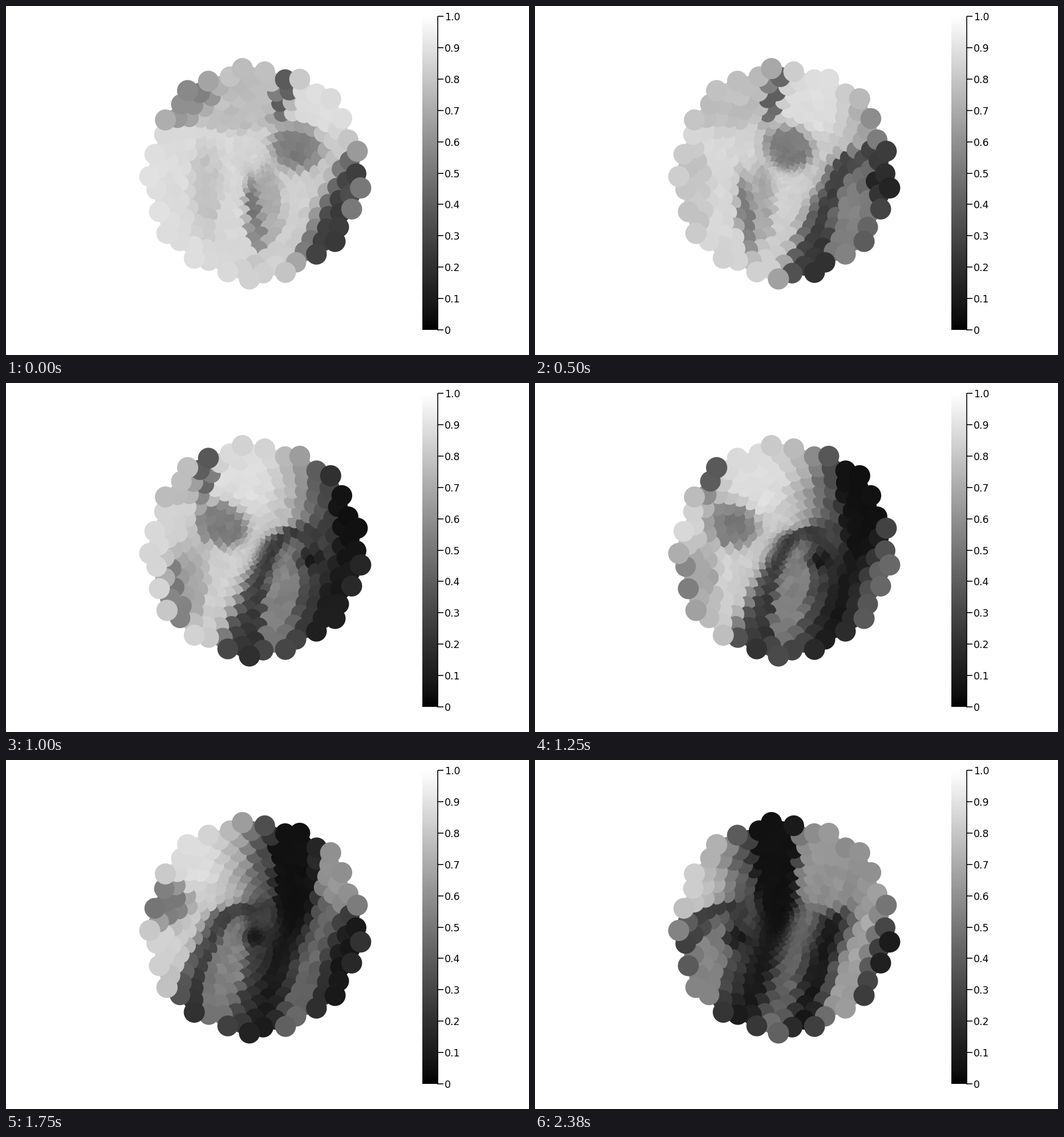
A matplotlib script that plays this animation: 917x611 px, repeating every 2510 ms.

```python
import numpy as np
import matplotlib.pyplot as plt
from matplotlib.animation import FuncAnimation

W, H, DPI = 917, 611, 100
PT = 72 / DPI
CENTER = 436.8, 292.2
DOTS, STEPS = 400, 20
SPEED = 17.3           # scene shift per step, px
TICK, STEP_MS = 10, 125
PHI = (1 + 5 ** 0.5) / 2

# Soft ellipses on the scene: x, y, half-axes, tilt in degrees, lightness
SHAPES = [
    (400, 140, 110, 75, 0, .77),
    (322, 168, 54, 24, -35, .57),
    (346, 320, 26, 85, 0, .79),
    (460, 350, 75, 28, 90, .69),
    (434, 370, 70, 13, 84, .50),
    (488, 150, 50, 14, 103, .35),
    (558, 168, 54, 58, 0, .88),
    (514, 246, 46, 40, 20, .51),
    (626, 372, 102, 32, 104, .54),
    (678, 312, 22, 16, 0, .08),
    (860, 150, 115, 95, 90, .60),
    (750, 160, 148, 41, 90, .05),
]


def sigmoid(x):
    return 1 / (1 + np.exp(-np.clip(x, -50, 50)))


def gray(light):
    """Perceptual lightness (0..1) to an sRGB gray level."""
    light = 100 * np.clip(light, 0, 1)
    lum = np.where(light > 8, ((light + 16) / 116) ** 3, light / 903.3)
    return np.where(lum > .0031308, 1.055 * lum ** (1 / 2.4) - .055, 12.92 * lum)


def rgb(light):
    return np.repeat(gray(light)[..., None], 3, axis=-1)


def backdrop(x, y):
    """Bright on the left, slanted dark stripes on the right."""
    low = sigmoid((y - 250) / 6)
    edge = 672 - 68 * low - .45 * np.maximum(y - 250, 0)
    bright = .89 - .0002 * (x - 235)
    t = x + .33 * (y - 350)
    swing = np.maximum(.35 + .0023 * (t - 780), .08)
    stripes = .08 + swing * (.5 + .5 * np.cos(2 * np.pi * (t - 780) / 110))
    dark = stripes + .11 * sigmoid((690 - t) / 10)
    return bright + (dark - bright) * sigmoid((x - edge) / (18 - 11 * low))


def scene(x, y):
    field = backdrop(x, y)
    for cx, cy, a, b, tilt, value in SHAPES:
        c, s = np.cos(np.radians(tilt)), np.sin(np.radians(tilt))
        dx, dy = x - cx, y - cy
        d = np.hypot((dx * c + dy * s) / a, (dy * c - dx * s) / b)
        field += (value - field) * sigmoid((1 - d) * np.sqrt(a * b) / 5)
    grain = np.sin(.41 * x + .23 * y) * np.sin(.31 * y - .19 * x)
    return field + .15 * field * (1 - field) * grain


# Golden-angle spiral, drawn from the middle outwards
n = np.arange(DOTS)
theta = 2 * np.pi * PHI * n
radius = 187.3 * n / (DOTS - 1)
px = CENTER[0] + radius * np.cos(theta)
py = CENTER[1] - radius * np.sin(theta)
diameter = 37.3 * np.sqrt(n / (DOTS - 1))
looks = [rgb(scene(px + SPEED * k, py)) for k in range(STEPS)]

fig = plt.figure(figsize=(W / DPI, H / DPI), dpi=DPI, facecolor="white")
ax = fig.add_axes([0, 0, 1, 1])
ax.axis("off")

# Colour bar
LEFT, RIGHT, TOP, BOTTOM = 730, 757, 18, 567
ramp = rgb(np.linspace(1, 0, 256)[:, None])
ax.imshow(ramp, extent=(LEFT, RIGHT, BOTTOM, TOP), aspect="auto")
line = dict(color="black", lw=1.6 * PT, solid_capstyle="butt")
ax.plot([RIGHT, RIGHT], [TOP - .5, BOTTOM + .5], **line)
for i in range(11):
    y = BOTTOM + (TOP - BOTTOM) * i / 10
    ax.plot([RIGHT, 766.5], [y, y], **line)
    ax.text(769, y, f"{i / 10:.1f}" if i else "0", family="DejaVu Sans",
            size=17.4 * PT, ha="left", va="center_baseline")

dots = ax.scatter(px, py, s=(diameter * PT) ** 2, c=looks[0], linewidths=0)
ax.set_xlim(0, W)
ax.set_ylim(H, 0)


def update(frame):
    step = min(frame * TICK // STEP_MS, STEPS - 1)
    dots.set_facecolor(looks[step])
    return dots,


anim = FuncAnimation(fig, update, frames=251, interval=TICK,
                     repeat=True, repeat_delay=0, blit=False)
plt.show()
```
